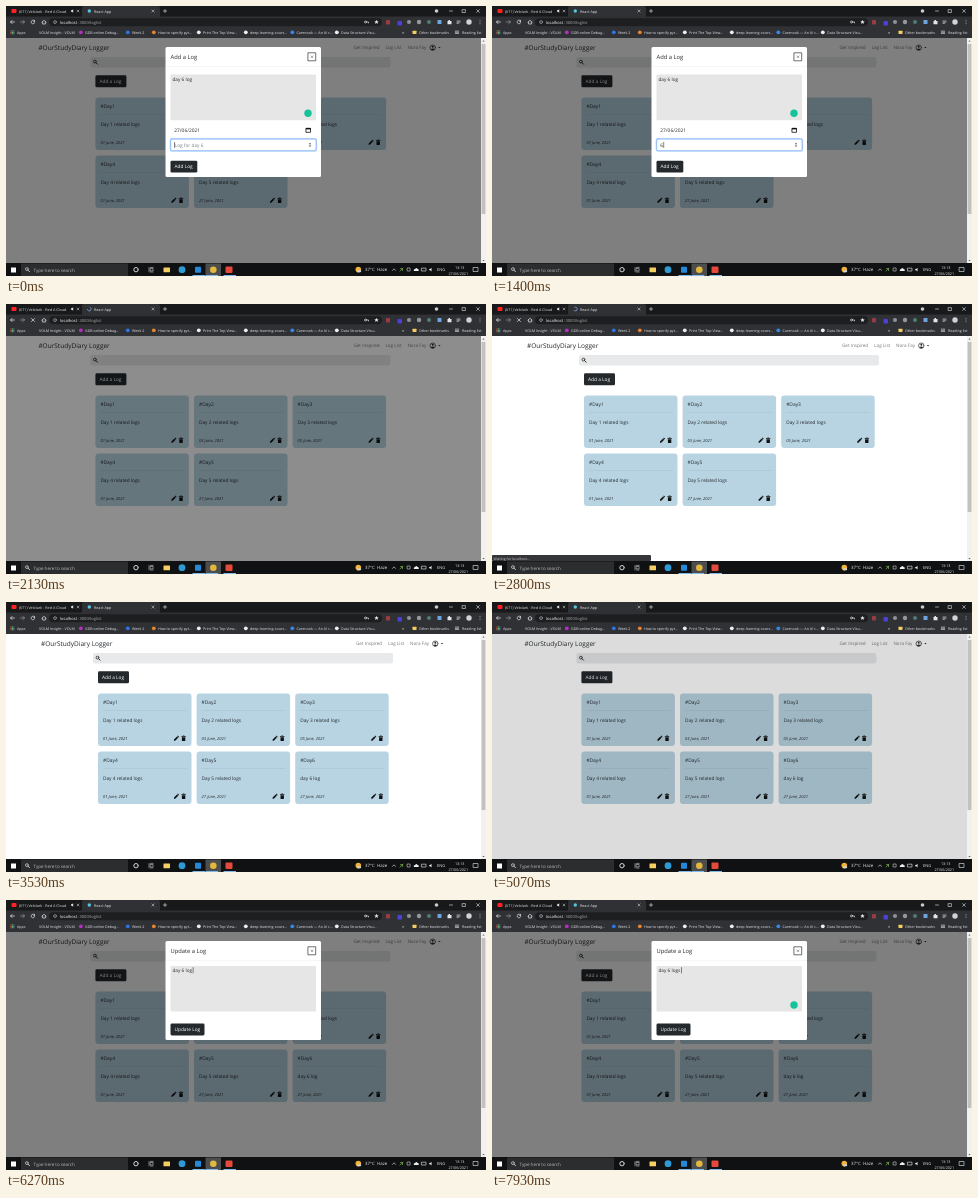
Animation of 480x270 px, one loop 8000 ms. Source, as an HTML page with a canvas:

```html
<!DOCTYPE html>
<html lang="en">
<head>
<meta charset="utf-8">
<title>Log manager</title>
<style>
html, body { margin: 0; width: 100%; height: 100%; overflow: hidden; background: #fff; }
canvas { display: block; width: 480px; height: 270px; }
</style>
</head>
<body>
<canvas width="480" height="270"></canvas>
<script>
const LOOP = 8000;
const ctx = document.querySelector('canvas').getContext('2d');
ctx.textRendering = 'geometricPrecision';
ctx.lineCap = 'round';

const INK = '#24292d', CHROME = '#e4e5e8';
const clamp = v => Math.max(0, Math.min(1, v));
const ramp = (t, start, ms) => clamp((t - start) / ms);
const easeOut = p => 1 - (1 - p) ** 1.7;

function text(s, x, y, size, color = INK, style = '') {
  ctx.font = `${style} ${size}px "Open Sans", "Noto Sans", sans-serif`;
  ctx.fillStyle = color;
  ctx.fillText(s, x, y);
}
function box(x, y, w, h, color, r = 0) {
  ctx.fillStyle = color;
  ctx.beginPath();
  ctx.roundRect(x, y, w, h, r);
  ctx.fill();
}
function frame(x, y, w, h, color, width = .6, r = 0) {
  ctx.strokeStyle = color;
  ctx.lineWidth = width;
  ctx.beginPath();
  ctx.roundRect(x, y, w, h, r);
  ctx.stroke();
}
function dot(x, y, r, color) {
  ctx.fillStyle = color;
  ctx.beginPath();
  ctx.arc(x, y, r, 0, 7);
  ctx.fill();
}
function ring(x, y, r, color, width = .7, from = 0, to = 6.3) {
  ctx.strokeStyle = color;
  ctx.lineWidth = width;
  ctx.beginPath();
  ctx.arc(x, y, r, from, to);
  ctx.stroke();
}
function stroke(path, x, y, color, width = .7) {
  ctx.save();
  ctx.translate(x, y);
  ctx.strokeStyle = color;
  ctx.lineWidth = width;
  ctx.stroke(new Path2D(path));
  ctx.restore();
}
function shape(path, x, y, color) {
  ctx.save();
  ctx.translate(x, y);
  ctx.fillStyle = color;
  ctx.fill(new Path2D(path));
  ctx.restore();
}
const cross = (x, y, r, color, w) => stroke(`M${-r} ${-r}L${r} ${r}M${r} ${-r}L${-r} ${r}`, x, y, color, w);
function lens(x, y, color, w = .7) {
  ring(x - .4, y - .4, 1.4, color, w);
  stroke('M.7 .7L2.2 2.2', x, y, color, w + .2);
}

function browser(t, loading) {
  box(0, 0, 480, 11, '#18191b');
  box(76, 0, 78, 12, '#303135', 2);
  box(0, 10.5, 480, 21.5, '#303135');
  box(5.5, 3, 5, 4, '#f22', 1);
  text('(671) Velolark - Red A Cloud', 13, 6.7, 3.7, CHROME);
  shape('M0-.8h1l1.2-1v3.6l-1.2-1h-1z', 65, 5, CHROME);
  cross(72, 5, 1, CHROME, .5);
  if (loading) ring(83.3, 5, 1.9, '#8ab4f8', .7, t / 120, t / 120 + 4);
  else dot(83.3, 5, 1.7, '#55c6e0');
  text('React App', 88, 6.7, 3.7, CHROME);
  cross(147, 5, 1.1, CHROME, .5);
  stroke('M-1.6 0h3.2M0-1.6v3.2', 159, 5, CHROME, .6);
  dot(430.5, 5, 1.8, '#ccc');
  stroke('M-1.5 0h3', 445, 5, CHROME, .6);
  frame(456.5, 3.6, 2.9, 2.9, CHROME, .6);
  cross(472, 5, 1.4, CHROME, .6);

  stroke('M2 0h-4M-.4-1.6L-2 0L-.4 1.6', 6.5, 16, CHROME);
  stroke('M-2 0h4M.4-1.6L2 0L.4 1.6', 16.5, 16, '#999');
  if (loading) cross(27, 16, 1.5, CHROME, .7);
  else {
    ring(27, 16, 1.8, CHROME, .7, .3, 5.4);
    shape('M0 0h2v-2z', 27, 15.8, CHROME);
  }
  stroke('M-2 0L0-2L2 0M-1.4-.4v2.2h2.8v-2.2', 38, 16.2, CHROME);
  box(43, 12.2, 333, 8, '#1d1e20', 4);
  ring(49, 16.1, 1.4, CHROME, .5);
  text('localhost', 54, 17.7, 4.1, '#fff');
  text(':3000/loglist', 72.3, 17.7, 4.1, '#aaa');
  ring(359.5, 16, 1, CHROME, .7);
  stroke('M1 0h2v.9', 359.5, 16, CHROME);
  shape('M0-2.2L.6-.7L2.2-.6L1 .4L1.4 2L0 1.1L-1.4 2L-1 .4L-2.2-.6L-.6-.7z', 370.5, 16, CHROME);
  box(380, 14, 4, 4.5, '#9a3b42', 1);
  box(391.5, 15, 4.5, 4.5, '#4a42d8', 1);
  dot(403, 16, 2.1, '#8d9298');
  dot(413, 16, 2.2, '#92989b');
  dot(423, 16, 2, '#4f7d74');
  box(431.5, 14, 4, 4, '#6ea5df', .5);
  shape('M-2-1h1v-1h1.5v1h1.5v3.2h-4z', 443.5, 16, CHROME);
  stroke('M-1.5-1h3M-1.5 .2h3M-1.5 1.4h1.5', 452.5, 16, CHROME, .6);
  dot(463, 16, 2.7, '#cfd3d8');
  for (const y of [14.3, 16, 17.7]) dot(474, y, .45, CHROME);

  for (let i = 0; i < 9; i++)
    box(4.5 + i % 3 * 1.4, 24.5 + (i / 3 | 0) * 1.4, 1, 1, ['#e55', '#6c6', '#59e'][i % 3]);
  const marks = [
    ['Apps', 11, ''], ['VOLM Insight - VOLM', 33, ''],
    ['GDB online Debug...', 79, '#b62fc1'], ['Week 2', 126, '#2d73e8'],
    ['How to specify pyt...', 152, '#e5832e'], ['Print The Top View...', 197, '#eee'],
    ['deep-learning-cours...', 244, '#eee'], ['Carenook — An AI c...', 290.5, '#3787e8'],
    ['Data Structure Visu...', 335, '#eee']
  ];
  for (const [label, x, color] of marks) {
    if (color) dot(x - 4.2, 26.3, 1.9, color);
    text(label, x, 27.8, 3.65, CHROME);
  }
  text('»', 396, 27.8, 4.5, CHROME);
  box(406.5, 24.8, 4, 3.2, '#f3cd62', .4);
  text('Other bookmarks', 413, 27.8, 3.65, CHROME);
  stroke('M-1.7-1.2h3.4M-1.7 0h3.4M-1.7 1.2h3.4', 451, 26.3, CHROME, .6);
  text('Reading list', 456, 27.8, 3.65, CHROME);
}

function taskbar() {
  box(0, 257, 480, 13, '#101112');
  box(5, 261.5, 5, 5, '#fff');
  box(15, 257.5, 107, 12.5, '#2c2d2e');
  lens(21.3, 263.5, '#ddd');
  text('Type here to search', 27.5, 265.6, 4.5, '#bbb');
  ring(130, 263.7, 2.2, '#fff', .8);
  stroke('M-2-2.2v4.4M-.5-1.2h2.6v2.4h-2.6zM-.5-2.3h2.6M-.5 2.3h2.6', 145, 263.7, '#ccc', .6);
  box(157.5, 261.5, 6.5, 4.8, '#f6cf62', .5);
  dot(176, 263.7, 3.4, '#2e9bd6');
  box(199.5, 257.5, 15.5, 12.5, '#4c4d4e');
  box(189, 260.7, 6, 6, '#2489d8', .7);
  dot(207.3, 263.7, 3.3, '#e2b73c');
  box(219.5, 260.5, 7, 6.5, '#e34a3c', 1);
  for (const x of [186.5, 199.5, 217.5]) box(x, 269, 12.5, 1, '#82b9e8');
  dot(352.3, 263.6, 2.8, '#f0b43c');
  box(351, 264.3, 4.2, 2, '#ccd2d8', 1);
  text('37°C  Haze', 359, 265.4, 4.4, '#eee');
  stroke('M-1.5 .8L0-.8L1.5 .8', 388, 263.6, '#eee', .6);
  stroke('M-1.5 1.5L1.5-1.5M-1-1h2v2', 395.5, 263.6, '#8fd05c', .6);
  frame(401.5, 262, 2.6, 3, '#eee', .5);
  shape('M-2.2 1.2q-.4-2 1.4-1.9q1-2 2.4 0q1.7 0 1.1 1.9z', 410, 263.8, '#eee');
  frame(415.8, 262.2, 4.2, 2.8, '#eee', .6);
  shape('M-1.8-.7h1l1.3-1.2v3.8l-1.3-1.2h-1z', 425, 263.6, '#eee');
  text('ENG', 431, 265.2, 4, '#eee');
  text('13:13', 449, 262.6, 3.7, '#eee');
  text('27/06/2021', 442.5, 268.5, 3.7, '#eee');
  frame(467.5, 261.5, 4.5, 4, '#eee', .6);
}

function card(i) {
  const x = 92 + i % 3 * 98.6, y = 91.5 + (i > 2) * 58;
  const day = ['01', '03', '05', '01', '27', '27'][i];
  box(x, y, 93.5, 52.5, '#b8d4e2', 3);
  text('#Day' + (i + 1), x + 5, y + 10.5, 4.9);
  box(x + 5, y + 17.2, 84, .4, '#93a9b5');
  text(i < 5 ? `Day ${i + 1} related logs` : 'day 6 log', x + 5, y + 28.4, 4.75);
  text(day + ' June, 2021', x + 5, y + 46, 4.1, INK, 'italic');
  shape('M-2.3 2.3v-1.2l3-3l1.2 1.2l-3 3zM1-2.2l.6-.6l1.2 1.2l-.6 .6z', x + 78.3, y + 44.9, '#111');
  shape('M-1.7-1.3h3.4v3.2q0 .7-.7 .7h-2q-.7 0-.7-.7zM-2.2-2.5h1.2l.4-.4h1.2l.4 .4h1.2v.8h-4.4z', x + 85.6, y + 45, '#111');
}

function page(shift, cards) {
  ctx.save();
  ctx.translate(shift, 0);
  text('#OurStudyDiary Logger', 35, 44.3, 6.5);
  const gray = '#777';
  text('Get Inspired', 350, 43.2, 4.6, gray);
  text('Log List', 382, 43.2, 4.6, gray);
  text('Nora Fay', 404, 43.2, 4.6, gray);
  ring(429.3, 41.7, 2.7, INK, .7);
  dot(429.3, 40.8, 1, INK);
  shape('M-1.9 1.3q1.9-1.7 3.8 0q-1.9 2-3.8 0z', 429.3, 42, INK);
  shape('M-1.2-.6h2.4L0 .7z', 436, 41.6, INK);
  box(87, 51, 300, 10.5, '#e8e9ea', 2);
  lens(91.9, 56, '#222', .8);
  box(92, 69.3, 31, 12, INK, 1.4);
  text('Add a Log', 96, 77, 4.8, '#fff');
  for (let i = 0; i < cards; i++) card(i);
  ctx.restore();
}

function scrollbar() {
  box(475, 32, 5, 225, '#f1f1f1');
  shape('M-1.1 .6h2.2L0-.7z', 477.5, 35, '#555');
  shape('M-1.1-.6h2.2L0 .7z', 477.5, 254.5, '#555');
  box(475.6, 38, 3.8, 170, '#c1c1c1');
}

function button(label, y, w) {
  box(164.5, y, w, 11.8, INK, 1.4);
  text(label, 168.5, y + 7.6, 4.8, '#fff');
}
function badge(x, y, scale = 1) {
  if (scale > 0) dot(x, y, 3.7 * scale, '#15c39a');
}

// Shared frame of both dialogs: p fades, slide is the vertical offset.
function dialog(title, h, alpha, slide, body) {
  if (alpha <= 0) return;
  const layer = ctx;
  layer.save();
  layer.beginPath();
  layer.rect(0, 32, 475, 225);
  layer.clip();
  layer.globalAlpha = alpha;
  layer.translate(0, slide);
  box(159.5, 41, 155.5, h, '#fff', 1.5);
  text(title, 164.5, 53.4, 5.8, INK, '500');
  frame(302.3, 46.8, 7.4, 8, '#333', .7);
  cross(306, 50.8, .9, '#444', .5);
  box(159.5, 60.5, 155.5, .4, '#eceef0');
  body();
  layer.restore();
}

function addForm(t) {
  const clicked = t >= 1500, typed = t >= 500;
  box(164.5, 68.6, 145.5, 45.6, '#e6e6e6', 1);
  text('day 6 log', 166.5, 74.7, 4.7);
  if (!clicked) badge(302, 107.3);
  text('27/06/2021', 168.3, 126.2, 4.85);
  frame(300.3, 122.3, 4.2, 4, '#111', .8);
  box(300, 122, 4.8, 1.4, '#111');
  if (clicked) frame(164.5, 133, 145.5, 12, '#e4e7ea', .4, 1);
  else {
    frame(164.5, 132.8, 145.8, 12, '#c2dbfe', 1.8, 1.4);
    frame(164.5, 132.8, 145.8, 12, '#78adf2', .5, 1.4);
    shape('M-1.3-.6h2.6L0-2zM-1.3 .8h2.6L0 2.2z', 304, 138.8, '#555');
  }
  if (typed) text('6', 168.3, 140.7, 4.85);
  else text('Log for day 6', 168.7, 140.7, 4.75, '#7b838a');
  if (!clicked && t % 1000 < 500) box(typed ? 171.6 : 168, 136, .5, 6, '#111');
  if (clicked) frame(163.9, 154.4, 28, 13, '#8d9093', 1.6, 2);
  button('Add Log', 154.8, 26.8);
}

function updateForm(t) {
  const typed = t >= 6670;
  box(164.5, 66, 145.5, 45.6, '#e6e6e6', 1);
  text(typed ? 'day 6 logs' : 'day 6 log', 166.5, 72.2, 4.7);
  if (t >= 6270 && (t < 6670 || (t - 6670) % 1000 < 500))
    box(typed ? 189.2 : 186.8, 67.3, .5, 6, '#111');
  badge(302, 105, easeOut(ramp(t, 6740, 200)));
  button('Update Log', 123.6, 34);
}

function draw(now) {
  const t = now % LOOP;
  const loading = t >= 1900 && t < 3065;
  const closing = 1965, opening = 5180;
  const blank = t >= 2865 && t < 2930;
  const shifted = t < closing + 300 || t >= 4865;
  const cards = t < 2865 ? 5 : t < 2995 ? 0 : 6;
  const dim = t < 4000 ? 1 - ramp(t, closing + 150, 150) : ramp(t, opening - 150, 150);

  box(0, 0, 480, 270, '#fff');
  if (!blank) {
    page(shifted ? -2.6 : 0, cards);
    box(0, 32, 475, 225, `rgba(0,0,0,${dim * .5})`);
    scrollbar();
  }
  if (t < 4000)
    dialog('Add a Log', 130, 1 - ramp(t, closing, 150), -17.6 * easeOut(ramp(t, closing, 300)), () => addForm(t));
  else
    dialog('Update a Log', 99, ramp(t, opening, 150), -17.6 * (1 - easeOut(ramp(t, opening, 300))), () => updateForm(t));

  if (t >= 2200 && t < 3530) {
    ctx.globalAlpha = 1 - ramp(t, 3270, 250);
    box(0, 251, 159, 6, '#35363a', 1);
    text('Waiting for localhost...', 1.5, 255.6, 3.5, '#ccc');
    ctx.globalAlpha = 1;
  }
  browser(t, loading);
  taskbar();
}

const start = performance.now();
(function tick() {
  draw(performance.now() - start);
  requestAnimationFrame(tick);
})();
</script>
</body>
</html>
```
